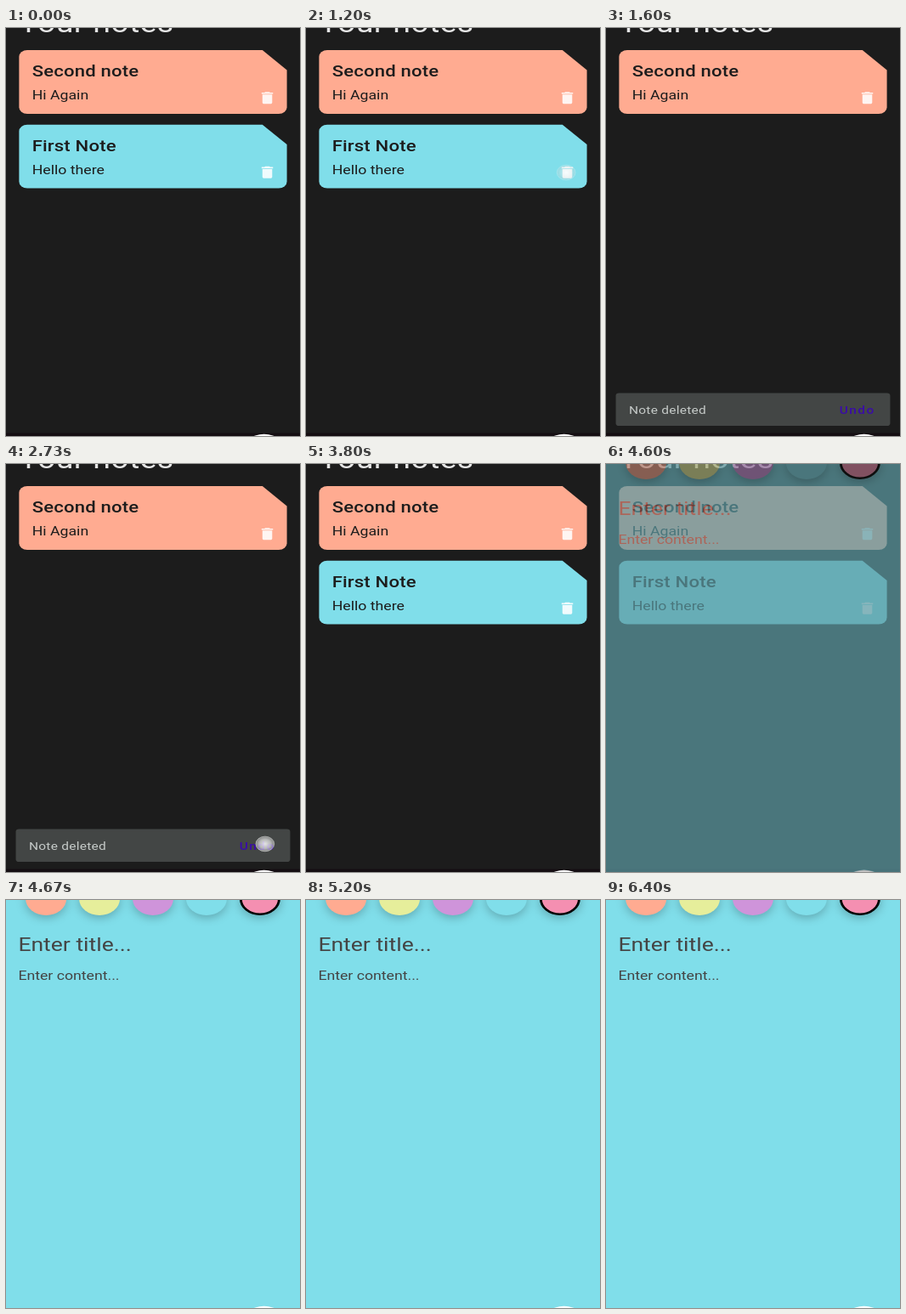
An HTML page that plays this animation: 346 px wide and 480 px high, repeating every 6470 ms.

```html
<!DOCTYPE html>
<html lang="en">
<head>
<meta charset="utf-8">
<title>Notes</title>
<style>
  html, body { margin: 0; width: 100%; height: 100%; overflow: hidden; background: #1c1c1c; }
  svg { display: block; width: 346px; height: 480px; }
  text { font-family: Roboto, sans-serif; white-space: pre; }
  .h4 { font-size: 39.1px; letter-spacing: .29px; fill: #e6e6e6; }
  .h5 { font-size: 27.6px; }
  .h6 { font-size: 23px; letter-spacing: .17px; font-weight: 500; }
  .body { font-size: 18.4px; }
  .card text { fill: #1c1c1c; }
  .small { font-size: 16.1px; letter-spacing: .29px; fill: #c6cbc9; }
  .button { font-size: 16.1px; letter-spacing: 1.44px; font-weight: 500; fill: #3a0ca8; }
  .swatches { filter: drop-shadow(0 5px 6px rgba(0, 0, 0, .22)); }
</style>
</head>
<body>
<svg viewBox="0 0 346 480">
  <defs>
    <radialGradient id="glow">
      <stop offset="0" stop-color="#fff" stop-opacity=".9"/>
      <stop offset=".6" stop-color="#e8e8e8" stop-opacity=".75"/>
      <stop offset="1" stop-color="#ccc" stop-opacity=".5"/>
    </radialGradient>
    <path id="sheet" d="M10 0H298L328 30V86a10 10 0 0 1-10 10H10a10 10 0 0 1-10-10V10A10 10 0 0 1 10 0z"/>
    <path id="bin" fill="#fff" fill-opacity=".88" d="M6 19c0 1.1.9 2 2 2h8c1.1 0 2-.9 2-2V7H6zM19 4h-3.5l-1-1h-5l-1 1H5v2h14z"/>
    <circle id="fab" cx="316" cy="640.5" r="28" fill="#fff"/>
  </defs>
  <!-- Phone layout in dp, 360 wide, shown with the recording's aspect ratio -->
  <g transform="scale(.961 .78)">
    <g id="home">
      <rect width="361" height="616" fill="#1c1c1c"/>
      <rect y="611" width="361" height="5" fill="#150e12"/>
      <text class="h4" x="16" y="6.4">Your notes</text>
      <g class="card" transform="translate(16 33.4)">
        <use href="#sheet" fill="#ffab91"/>
        <text class="h6" x="16" y="40.3">Second note</text>
        <text class="body" x="16" y="74.2">Hi Again</text>
        <use href="#bin" x="292" y="60"/>
      </g>
      <g class="card" id="first" transform="translate(16 145.7)">
        <use href="#sheet" fill="#80deea"/>
        <text class="h6" x="16" y="40.3">First Note</text>
        <text class="body" x="16" y="74.2">Hello there</text>
        <use href="#bin" x="292" y="60"/>
      </g>
      <use href="#fab"/>
      <g id="snack">
        <rect x="12" y="550.5" width="336" height="49.5" rx="4" fill="#434645"/>
        <text class="small" x="28" y="582">Note deleted</text>
        <text class="button" x="286" y="582">Undo</text>
      </g>
    </g>
    <g id="editor">
      <rect width="361" height="616" fill="#80deea"/>
      <g class="swatches" id="swatches"></g>
      <g id="hints">
        <text class="h5" x="15" y="76.5">Enter title...</text>
        <text class="body" x="15" y="120">Enter content...</text>
      </g>
      <use href="#fab"/>
    </g>
    <circle id="touch" r="11.3" fill="url(#glow)" stroke="#fff" stroke-opacity=".55"/>
  </g>
</svg>
<script>
const LOOP = 6470;
const $ = id => document.getElementById(id);
const ramp = (t, from, to) => Math.min(1, Math.max(0, (t - from) / (to - from)));
const within = (t, from, to) => t >= from && t < to;
const show = (el, alpha) => {
  el.setAttribute('opacity', alpha);
  el.style.display = alpha > 0 ? '' : 'none';
};

// Colour choices; the selected one carries a black border
$('swatches').innerHTML = ['#ffab91', '#e6ee9b', '#cf94da', '#80deea', '#f48fb1']
  .map((fill, i) => `<circle cx="${49 + 65.5 * i}" cy="-2" r="${i < 4 ? 25 : 23.5}" fill="${fill}"` +
    (i < 4 ? '/>' : ' stroke="#000" stroke-width="3"/>')).join('');

// Taps: position in dp, time down and up, peak opacity
const taps = [
  { x: 318.6, y: 218, from: 1130, to: 1240, alpha: .5 },
  { x: 317.2, y: 573, from: 2565, to: 2850, alpha: .95 }
];

function draw(t) {
  const deleted = within(t, 1250, 2870);
  show($('first'), deleted ? 0 : 1);

  const grow = ramp(t, 1250, 1330);
  const scale = .8 + .2 * grow;
  show($('snack'), grow * (1 - ramp(t, 2850, 2930)));
  $('snack').setAttribute('transform', `translate(180 575) scale(${scale}) translate(-180 -575)`);

  const fade = ramp(t, 4540, 4670);
  show($('home'), 1 - fade);
  show($('editor'), fade);
  $('hints').setAttribute('fill', fade < 1 ? '#c8645a' : '#444');

  const tap = taps.find(p => within(t, p.from, p.to));
  show($('touch'), tap ? tap.alpha * ramp(t, tap.from, tap.from + 40) : 0);
  if (tap) $('touch').setAttribute('transform', `translate(${tap.x} ${tap.y})`);
}

const start = performance.now();
function tick() {
  draw((performance.now() - start) % LOOP);
  requestAnimationFrame(tick);
}
tick();
</script>
</body>
</html>
```
